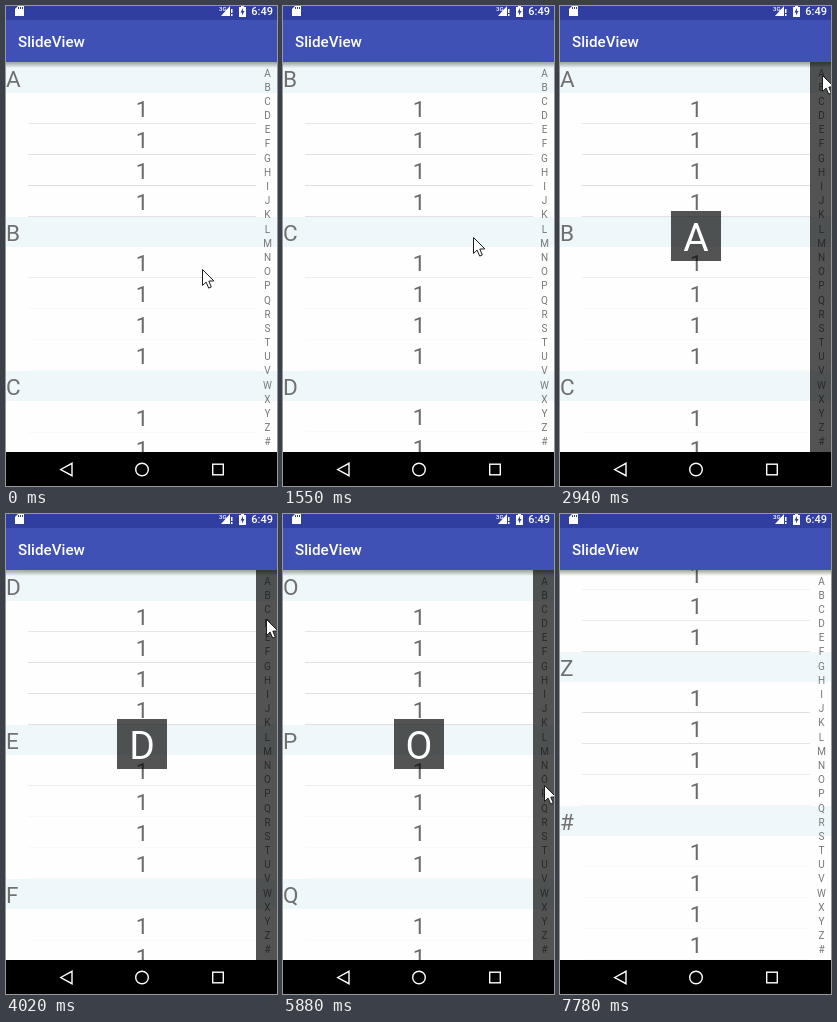
An HTML page with a canvas for the animation above (8 s loop, 271x480 px).

```html
<!DOCTYPE html>
<html lang="en">
<head>
<meta charset="utf-8">
<title>SlideView</title>
<style>
  html, body { margin: 0; width: 100%; height: 100%; overflow: hidden; background: #fff; }
  canvas { display: block; }
</style>
</head>
<body>
<canvas width="271" height="480"></canvas>
<script>
const ctx = document.querySelector('canvas').getContext('2d');
const LOOP = 8000, TICK = 140, TOUCH_START = 2940, TOUCH_END = 7700;
const TOP = 57, BOTTOM = 446, HEADER = 30.3, SECTION = 154.15;
const ROW = (SECTION - HEADER) / 4;
const LETTERS = [...'ABCDEFGHIJKLMNOPQRSTUVWXYZ#'];
const MAX_SCROLL = TOP + LETTERS.length * SECTION - BOTTOM;
const SHADE = 'rgba(0,0,0,.67)';

// Keyframes: [time, value, ...]
const pointer = [[140, 196, 263], [840, 180, 350], [1120, 181, 324], [1960, 199, 138],
  [2380, 265, 86], [2660, 262, 69], [3220, 262, 69], [5040, 258, 162], [6580, 263, 362],
  [7420, 262, 440], [7560, 262, 440], [7700, 290, 440]];
const drag = [[840, 0], [1120, 27.72], [1960, 281.5], [2380, 420]];

function sample(keys, t) {
  const next = keys.findIndex(k => k[0] > t);
  if (next === 0) return keys[0].slice(1);
  if (next < 0) return keys[keys.length - 1].slice(1);
  const a = keys[next - 1], b = keys[next], f = (t - a[0]) / (b[0] - a[0]);
  return a.slice(1).map((v, i) => v + (b[i + 1] - v) * f);
}

function rect(x, y, w, h, color) {
  ctx.fillStyle = color;
  ctx.fillRect(x, y, w, h);
}

function text(str, x, y, size, color, align = 'center', weight = 400) {
  ctx.font = `${weight} ${size}px Roboto, sans-serif`;
  ctx.textAlign = align;
  ctx.fillStyle = color;
  ctx.fillText(str, x, y);
}

function polygon(points, color) {
  ctx.beginPath();
  for (const [x, y] of points) ctx.lineTo(x, y);
  ctx.closePath();
  ctx.fillStyle = color;
  ctx.fill();
}

function drawList(scroll) {
  rect(0, 56, 271, BOTTOM - 56, '#fefefe');
  LETTERS.forEach((letter, i) => {
    const y = TOP + i * SECTION - scroll;
    if (y > BOTTOM || y + SECTION < 56) return;
    const band = Math.round(y);
    rect(0, band, 271, 30, '#eef7fa');
    text(letter, 0, band + 24, 22.5, '#707070', 'left');
    for (let row = 0; row < 4; row++) {
      const top = y + HEADER + row * ROW, line = Math.round(top + ROW) - 1;
      text('1', 136, Math.round(top) + 24, 22.5, '#6a6a6a');
      // Hairlines fade towards the lower half
      const alpha = .02 + .1 * Math.max(0, Math.cos((line - 180) / 80));
      rect(22, line, 228, 1, `rgba(0,0,0,${alpha})`);
    }
  });
  LETTERS.forEach((letter, i) => text(letter, 261.5, 70.5 + i * 14.19, 10, '#777'));
}

function drawTouch(index) {
  rect(250, 56, 21, BOTTOM - 56, SHADE);
  rect(111, 205, 50, 50, SHADE);
  text(LETTERS[index], 136, 245, 39, '#fff');
}

function drawBars() {
  const shadow = ctx.createLinearGradient(0, 56, 0, 62);
  shadow.addColorStop(0, 'rgba(0,0,0,.36)');
  shadow.addColorStop(1, 'rgba(0,0,0,0)');
  rect(0, 56, 271, 6, shadow);
  rect(0, 0, 271, 14, '#303f9f');
  rect(0, 14, 271, 42, '#3f51b5');
  text('SlideView', 12, 41, 15.2, '#fff', 'left', 500);

  polygon([[12, 0], [18, 0], [18, 10], [9, 10], [9, 3]], '#fff');
  for (let x = 12; x < 17; x += 2) rect(x, 1, 1, 2, '#303f9f');
  text('3G', 213, 5, 6, '#fff', 'left', 500);
  polygon([[224, 0], [224, 10], [215, 10]], '#fff');
  rect(225, 3, 1.5, 4, '#fff');
  rect(225, 8, 1.5, 2, '#fff');
  rect(233, 1, 7, 10, '#fff');
  rect(235, 0, 3, 1, '#fff');
  polygon([[237, 2], [234.5, 6.5], [236, 6.5], [236, 9.5], [238.5, 5], [237, 5]], '#303f9f');
  text('6:49', 267, 9, 11, '#fff', 'right', 500);

  rect(0, BOTTOM, 271, 480 - BOTTOM, '#000');
  ctx.strokeStyle = '#fff';
  ctx.lineWidth = 1.4;
  polygon([[54.7, 463.5], [66, 457.3], [66, 469.7]], '#000');
  ctx.stroke();
  ctx.beginPath();
  ctx.arc(136, 463.5, 6.3, 0, 2 * Math.PI);
  ctx.stroke();
  ctx.strokeRect(206.7, 458.2, 10.6, 10.6);
}

function drawPointer(x, y) {
  ctx.save();
  ctx.translate(Math.round(x) + .5, Math.round(y) + .5);
  polygon([[0, 0], [0, 16], [3.6, 12.6], [6.2, 18.6], [8.8, 17.5], [6.3, 11.6], [11.4, 11.4]], '#fff');
  ctx.strokeStyle = '#1c1c1c';
  ctx.lineWidth = 1;
  ctx.stroke();
  ctx.restore();
}

function draw() {
  const clock = performance.now() % LOOP;
  const t = Math.floor((clock + 20) / TICK) * TICK;
  const [x, y] = sample(pointer, t);
  const index = Math.min(Math.floor((y - 60) / 14.5), LETTERS.length - 1);
  const scroll = t < TOUCH_START ? sample(drag, t)[0] : Math.min(index * SECTION, MAX_SCROLL);

  drawList(scroll);
  if (t >= TOUCH_START && t < TOUCH_END) drawTouch(index);
  drawBars();
  drawPointer(x, y);
  requestAnimationFrame(draw);
}
draw();
</script>
</body>
</html>
```
